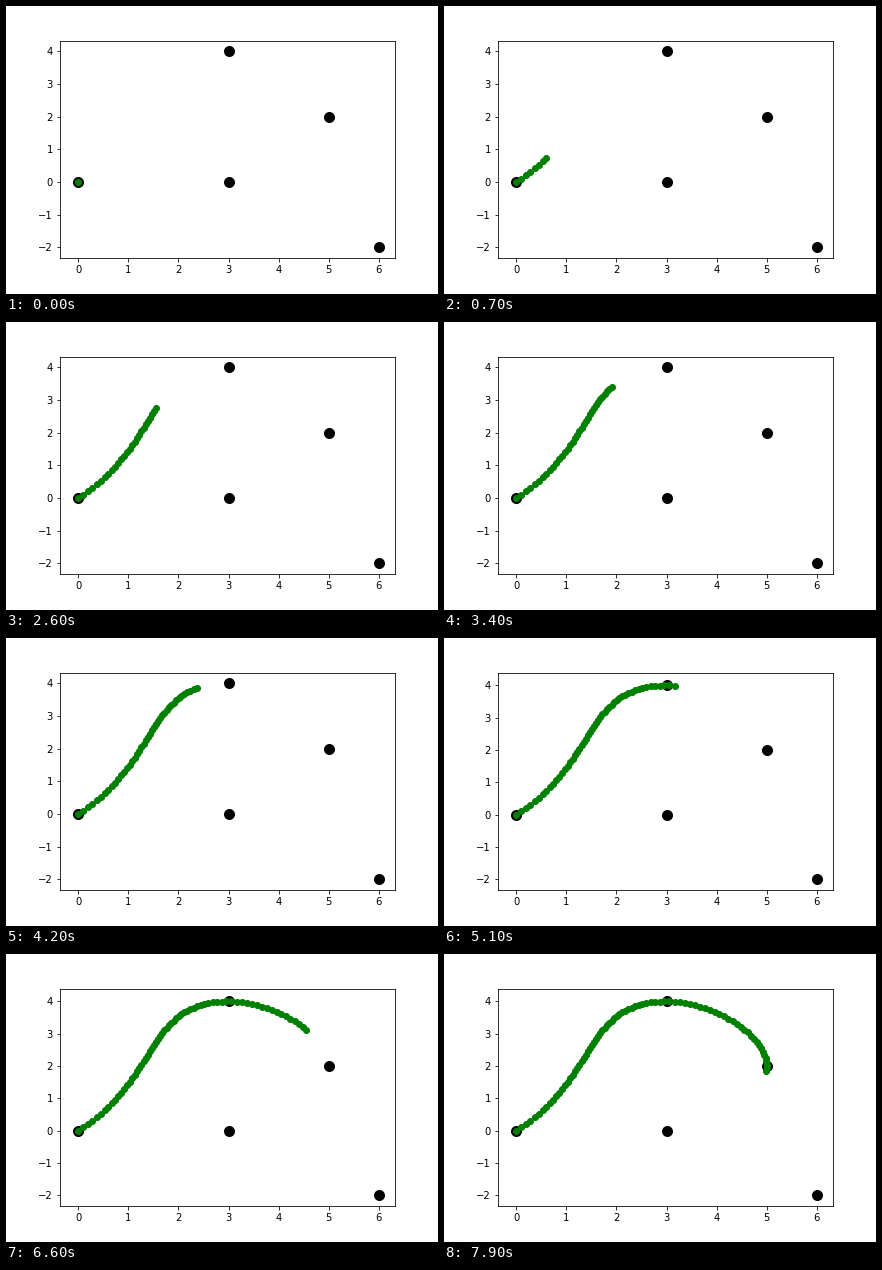
Recreate the animation shown at these times as a matplotlib script. Size 432 by 288 pixels, loop 8 s.

```python
import numpy as np
import matplotlib.pyplot as plt
from matplotlib.animation import FuncAnimation

FRAMES, INTERVAL = 80, 100
MARGIN = 0.05
DT = 0.1

waypoints = np.array([(0, 0), (3, 4), (5, 2), (3, 0), (6, -2)], dtype=float)
velocities = np.array([(1, 1), (1, 0), (0, -1), (0, -1), (1, 0)], dtype=float)


def hermite(p0, p1, v0, v1, duration, u):
    """Cubic from p0 to p1 with end velocities v0 and v1, for u in 0..1."""
    return ((1 + 2 * u) * (1 - u) ** 2 * p0
            + u * (1 - u) ** 2 * duration * v0
            + u ** 2 * (3 - 2 * u) * p1
            + u ** 2 * (u - 1) * duration * v1)


# Each leg lasts as long as its straight distance: mean speed 1
legs = np.hypot(*np.diff(waypoints, axis=0).T)
arrivals = np.concatenate(([0], np.cumsum(legs)))


def position(t):
    k = min(np.searchsorted(arrivals, t, side="right") - 1, len(legs) - 1)
    return hermite(*waypoints[k:k + 2], *velocities[k:k + 2], legs[k],
                   (t - arrivals[k]) / legs[k])


times = np.linspace(0, arrivals[-1], int(arrivals[-1] / DT))
path = np.array([position(t) for t in times[:FRAMES]])


def padded(low, high):
    pad = MARGIN * (high - low)
    return low - pad, high + pad


plt.rcParams["font.family"] = "DejaVu Sans"
plt.rcParams["font.size"] = 10

fig, ax = plt.subplots(figsize=(6, 4), dpi=72, facecolor="white")
fig.subplots_adjust(left=0.125, right=0.9, bottom=0.125, top=0.88)
ax.set_xticks(range(7))
ax.set_yticks(range(-2, 5))
ax.set_xlim(padded(-0.06, 6.015))

ax.scatter(*waypoints.T, s=100, color="black", zorder=1)
trail = ax.scatter([0], [0], s=36, color="green", zorder=1.5)


def update(i):
    done = path[:i + 1]
    trail.set_offsets(done)
    # The view makes room for the dots near the top
    top = max(4.023, done[:, 1].max() + 0.092)
    ax.set_ylim(padded(-2.023, top))
    return (trail,)


anim = FuncAnimation(fig, update, frames=FRAMES, interval=INTERVAL,
                     init_func=lambda: update(0), repeat=True, repeat_delay=0)
plt.show()
```
